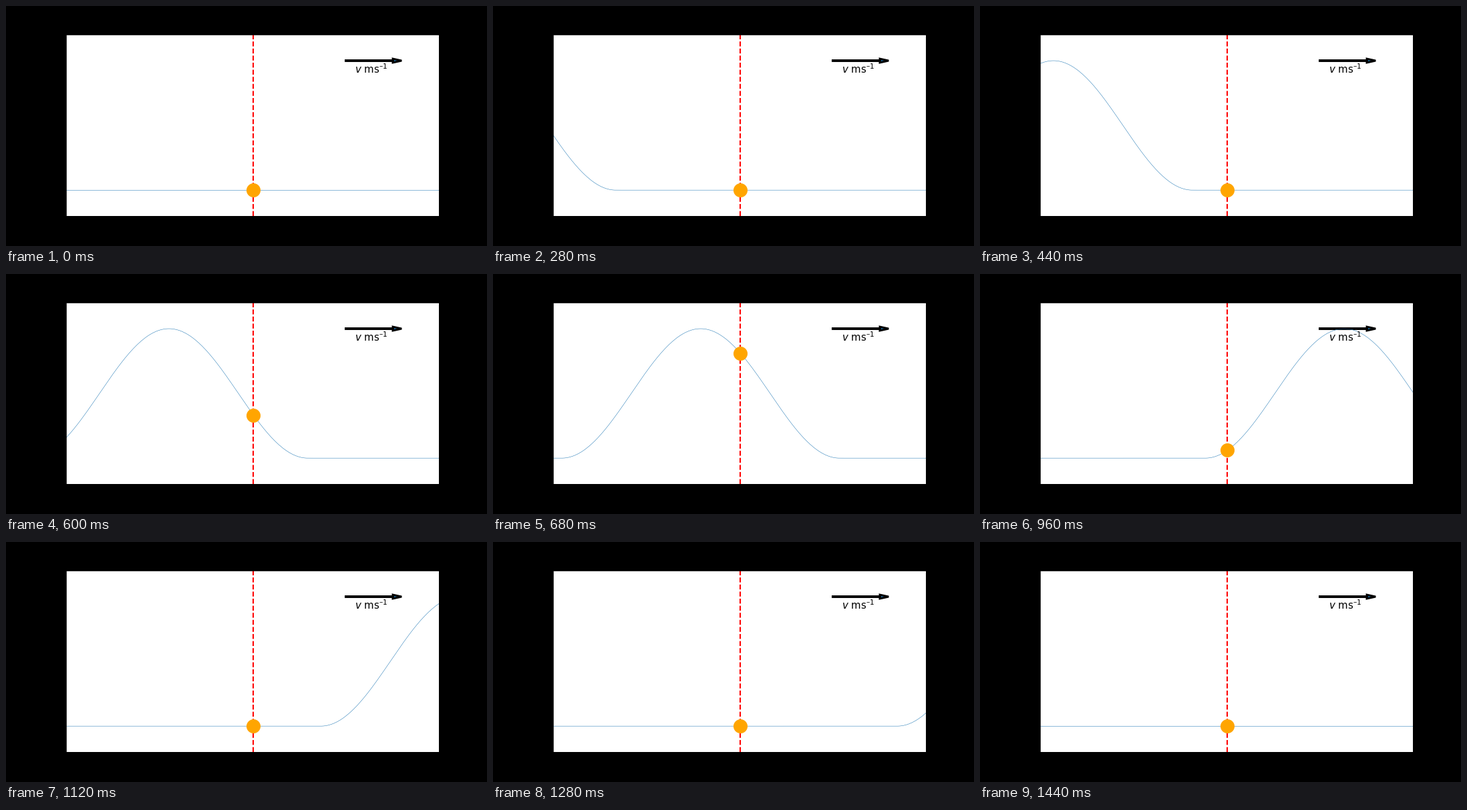
Write a matplotlib script that moves like this. It is 720 px wide and 360 px high and loops after 2000 ms.

```python
import numpy as np
import matplotlib.pyplot as plt
from matplotlib.animation import FuncAnimation

FRAMES = 50
INTERVAL = 40        # ms
SPEED = 0.06         # axes widths per frame
WIDTH = 0.745        # length of the pulse
START = -0.6242      # centre of the pulse at frame 0
BALL_X = 100 / 199


def pulse(x, frame):
    """Raised-cosine pulse travelling to the right."""
    d = x - START - SPEED * frame
    return np.where(np.abs(d) < WIDTH / 2, np.cos(np.pi * d / WIDTH) ** 2, 0.0)


fig = plt.figure(figsize=(10, 5), dpi=72, facecolor="black")
fig.subplots_adjust(left=0.125, right=0.9, bottom=0.125, top=0.88)
ax = fig.add_subplot()
ax.set(xlim=(0, 1), ylim=(-0.2, 1.2), xticks=[], yticks=[])

# The wave reaches past the axes on both sides.
xs = np.linspace(-1, 2, 601)
wave, = ax.plot(xs, pulse(xs, 0), lw=0.5)
ax.axvline(BALL_X, color="r", ls="--", lw=2)
ball, = ax.plot([BALL_X], [0], "o", color="orange", ms=20)

ax.arrow(0.75, 1, 0.1264, 0, width=0.005, head_width=0.03,
         head_length=0.0236, lw=3, fc="C0", ec="black")
ax.text(0.775, 0.9, "$v$ ms$^{–1}$", fontsize=15)


def update(frame):
    wave.set_ydata(pulse(xs, frame))
    ball.set_ydata([pulse(BALL_X, frame)])
    return wave, ball


anim = FuncAnimation(fig, update, frames=FRAMES, interval=INTERVAL,
                     repeat=True, repeat_delay=0)
plt.show()
```
